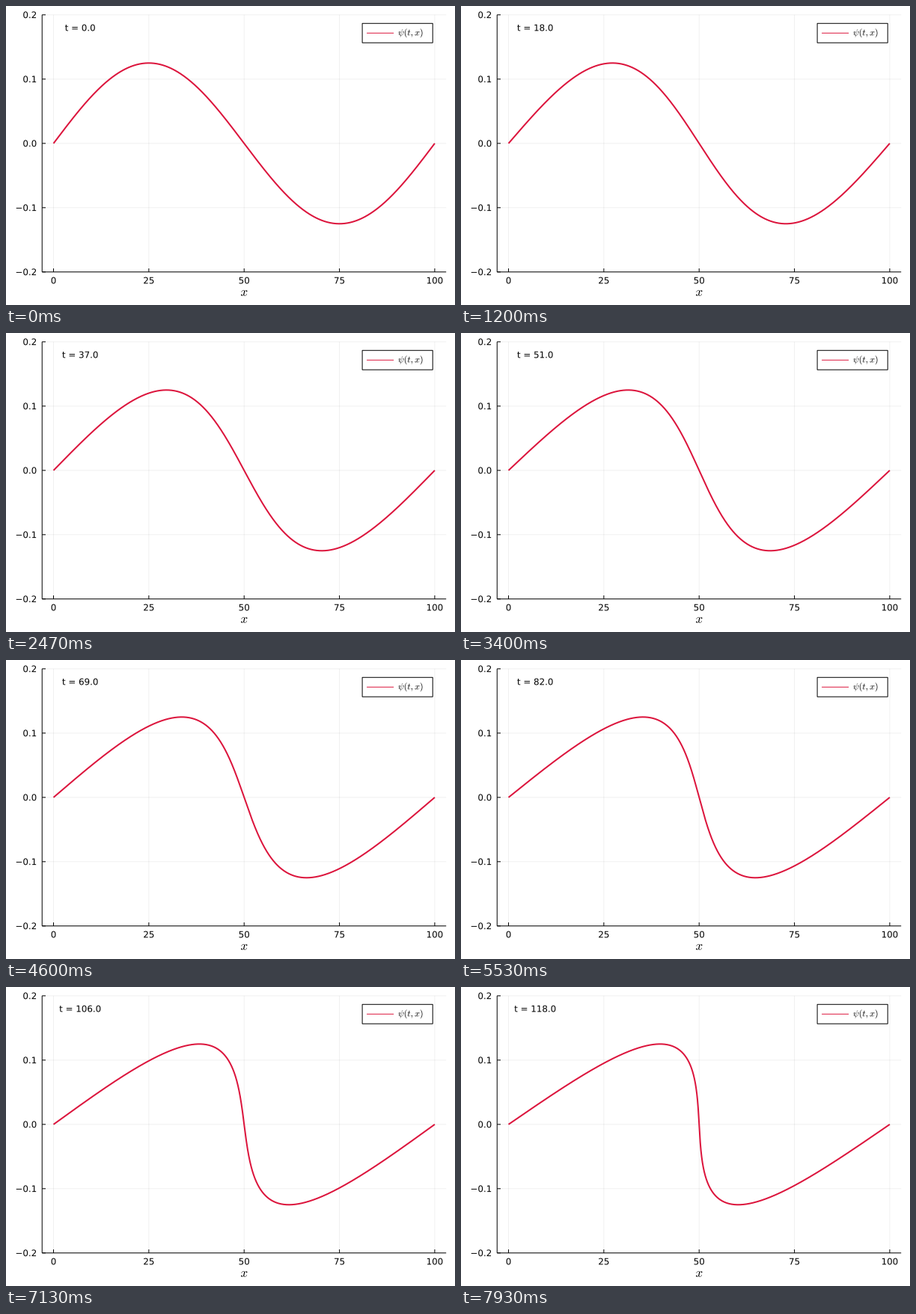
Animation, 600 px wide and 400 px high, one loop 8000 ms. Source, as a matplotlib script:

```python
import numpy as np
import matplotlib.pyplot as plt
from matplotlib.animation import FuncAnimation
from matplotlib.patches import PathPatch, Rectangle
from matplotlib.textpath import TextPath
from matplotlib.transforms import Affine2D

W, H, DPI = 600, 400, 100
FRAMES, LOOP_MS = 120, 8000
LEFT, RIGHT, TOP, BOTTOM = 48.235, 588.19, 11.81, 355.795
TICK = 4.72
EM, CAP = 11.85, 8.64
AMPLITUDE, LENGTH = 0.125, 100
RED = "#DC143C"

plt.rcParams.update({
    "font.family": "DejaVu Sans",
    "mathtext.fontset": "cm",
    "lines.solid_capstyle": "butt",
})


def pt(px):
    return px * 72 / DPI


def px_x(x):
    return LEFT + (x + 3) / 106 * (RIGHT - LEFT)


def px_y(y):
    return BOTTOM - (y + 0.2) / 0.4 * (BOTTOM - TOP)


fig = plt.figure(figsize=(W / DPI, H / DPI), dpi=DPI, facecolor="white")
ax = fig.add_axes([0, 0, 1, 1])
ax.set_xlim(0, W)
ax.set_ylim(H, 0)
ax.axis("off")


def line(xs, ys, color="black", width=1.0, **kw):
    return ax.plot(xs, ys, color=color, lw=pt(width), snap=False, **kw)[0]


def outline(path, x, y):
    return path.transformed(Affine2D().scale(1, -1).translate(x, y))


def text_path(x, y, s, align=0.5):
    """Text outline on baseline y, aligned by its advance width."""
    path = TextPath((0, 0), s, size=EM)
    ink_right = path.get_extents().x1
    advance = TextPath((0, 0), s + s, size=EM).get_extents().x1 - ink_right
    return outline(path, x - align * advance, y)


def math_path(x, y, s, size, align=0.5):
    """Formula outline centred vertically on y."""
    path = TextPath((0, 0), s, size=size)
    box = path.get_extents()
    return outline(path, x - box.x0 - align * box.width,
                   y + (box.y0 + box.y1) / 2)


def fill(path):
    return ax.add_patch(PathPatch(path, fc="black", lw=0, snap=False, zorder=5))


# Grid, ticks and tick labels
for v in (0, 25, 50, 75, 100):
    x = px_x(v)
    line([x, x], [TOP, BOTTOM], alpha=0.06, zorder=1)
    line([x, x], [BOTTOM - TICK, BOTTOM], zorder=2)
    fill(text_path(x, BOTTOM + 15.6, str(v)))

for v in (-0.2, -0.1, 0.0, 0.1, 0.2):
    y = px_y(v)
    line([LEFT, RIGHT], [y, y], alpha=0.06, zorder=1)
    line([LEFT, LEFT + TICK], [y, y], zorder=2)
    fill(text_path(LEFT - 7, y + CAP / 2, f"{v:.1f}".replace("-", "\u2212"), 1))

line([LEFT, LEFT], [TOP, BOTTOM], zorder=2)
line([LEFT, RIGHT], [BOTTOM, BOTTOM], zorder=2)
fill(math_path(px_x(50), 384, "$x$", 17))

# Legend
ax.add_patch(Rectangle((476.1, 23.28), 94.1, 25.92, fc="white", ec="black",
                       lw=pt(1), snap=False, zorder=4))
line([482.1, 518.1], [36.24, 36.24], RED, 1, zorder=5)
fill(math_path(524.2, 36.24, r"$\psi(t,x)$", 12, 0))

curve = line([], [], RED, 2.0, zorder=3, solid_joinstyle="round")
clock = fill(text_path(0, 0, "t"))

start = np.linspace(0, LENGTH, 801)
psi = AMPLITUDE * np.sin(2 * np.pi * start / LENGTH)


def update(t):
    # Each point of the wave travels at a speed equal to its own height
    curve.set_data(px_x(start + psi * t), px_y(psi))
    clock.set_path(text_path(px_x(7), px_y(0.18) + CAP / 2, f"t = {t:.1f}"))
    return curve, clock


anim = FuncAnimation(fig, update, frames=FRAMES, interval=LOOP_MS / FRAMES,
                     init_func=lambda: update(0), repeat=True, repeat_delay=0)
plt.show()
```
